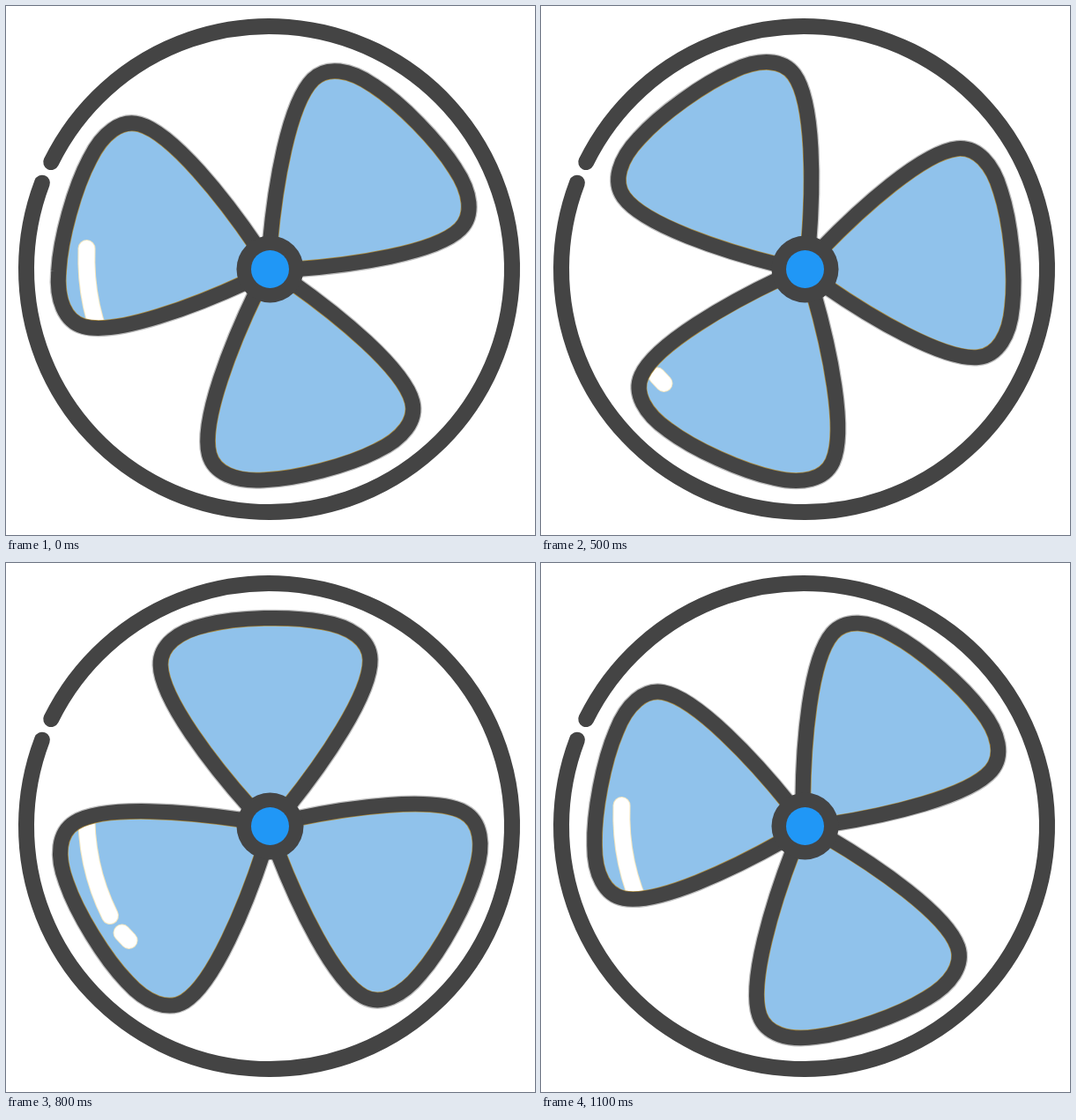
These frames come from a looping animation (600 by 600 pixels, 1200 ms). An HTML page with a canvas:

```html
<!DOCTYPE html>
<html lang="en">
<head>
<meta charset="utf-8">
<title>Fan</title>
<style>
  html, body { margin: 0; width: 100%; height: 100%; overflow: hidden; background: #fff; }
  canvas { display: block; width: 600px; height: 600px; }
</style>
</head>
<body>
<canvas id="stage" width="600" height="600"></canvas>
<script>
const ctx = document.getElementById('stage').getContext('2d');
const DARK = '#444', SKY = '#90c2eb', BLUE = '#2097f6', GOLD = '#ab8a3c';
const CX = 299, CY = 298.5;
const STEP = 100, STEPS = 12;
const rad = deg => deg * Math.PI / 180;

// One blade pointing along +x, with the hub at the origin.
const blade = new Path2D(`M0 0 L20 20 C70 62.5 147 119 186 119
  C208 119 224 98 230 66 C238 30 238 -30 230 -66
  C224 -98 208 -119 186 -119 C147 -119 70 -62.5 20 -20 Z`);

const glints = new Path2D('M91.5 275 Q89 342 118 400 M131.5 419.5 L139.5 428');

// The turn speeds up through the loop; the next loop starts 120 degrees on.
const angleAt = k => 75.5 + 5.5 * k + 0.453 * k * k;

function rotor(angle) {
  const path = new Path2D();
  for (let i = 0; i < 3; i++) {
    path.addPath(blade, new DOMMatrix().translate(CX, CY).rotate(angle + i * 120));
  }
  return path;
}

function stroke(path, width, color) {
  ctx.lineWidth = width;
  ctx.strokeStyle = color;
  ctx.stroke(path);
}

function disc(r, color) {
  ctx.fillStyle = color;
  ctx.beginPath();
  ctx.arc(CX + 0.5, CY, r, 0, 2 * Math.PI);
  ctx.fill();
}

function draw(step) {
  ctx.fillStyle = '#fff';
  ctx.fillRect(0, 0, 600, 600);
  ctx.lineCap = ctx.lineJoin = 'round';

  const ring = new Path2D();
  ring.arc(298.5, 298.5, 275.5, rad(206.15), rad(560.8));
  stroke(ring, 18, DARK);

  const blades = rotor(angleAt(step));
  stroke(blades, 19.5, 'rgba(68,68,68,.35)');
  ctx.save();
  ctx.clip(blades);
  ctx.fillStyle = SKY;
  ctx.fill(blades);
  stroke(glints, 20, '#f3e6c0');
  stroke(glints, 18, '#fff');
  stroke(blades, 18.5, GOLD);
  ctx.restore();
  stroke(blades, 17, DARK);

  disc(38, DARK);
  disc(21.5, BLUE);
}

function tick(now) {
  draw(Math.floor(now / STEP) % STEPS);
  requestAnimationFrame(tick);
}
draw(0);
requestAnimationFrame(tick);
</script>
</body>
</html>
```
